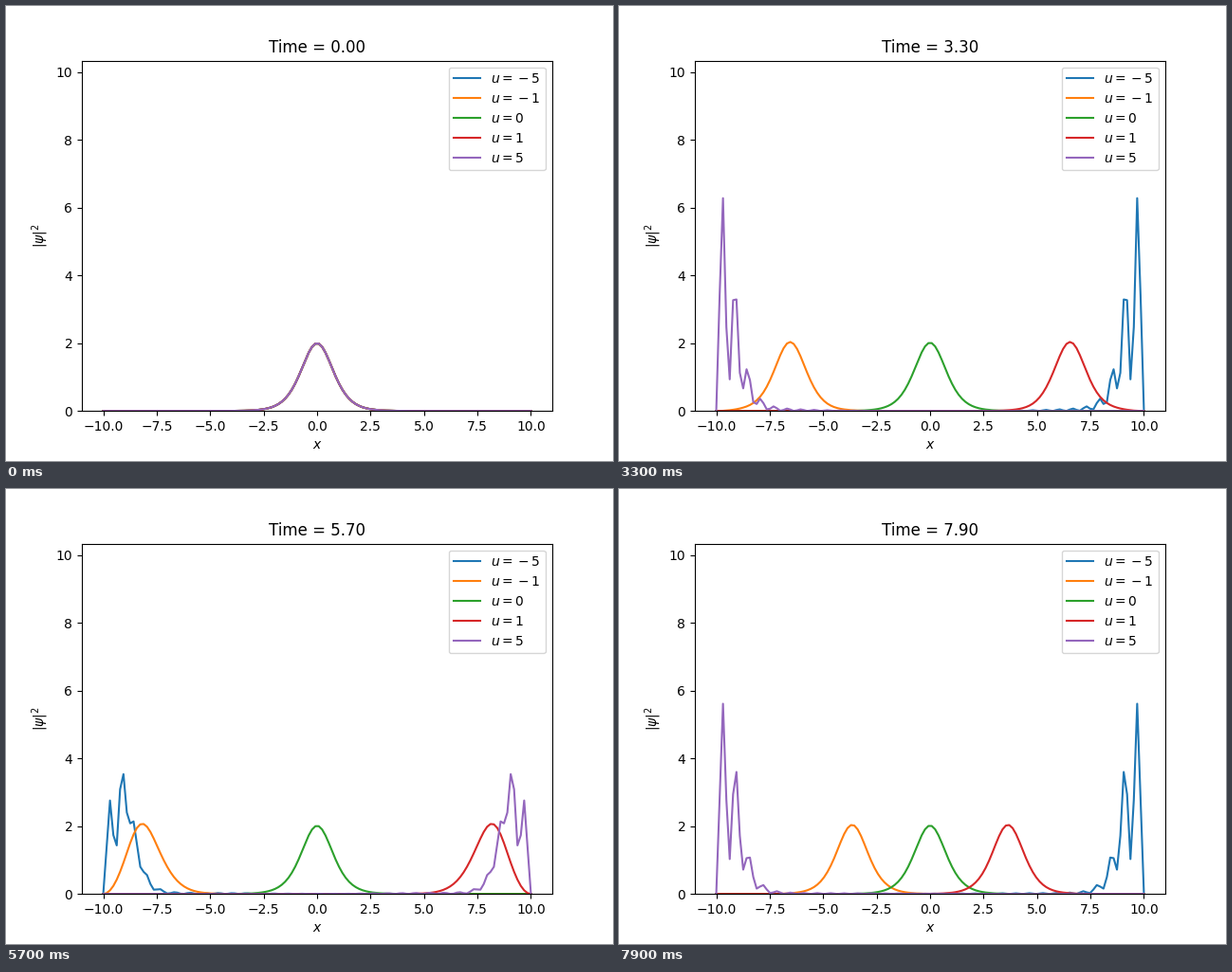
A matplotlib script for the animation above (8000 ms loop, 640x480 px).

```python
import numpy as np
import matplotlib.pyplot as plt
from matplotlib.animation import FuncAnimation

FRAMES = 80
INTERVAL = 100          # ms
FRAME_TIME = 0.1
SUBSTEPS = 100
SPEEDS = [-5, -1, 0, 1, 5]

x = np.linspace(-10, 10, 128)
dx = x[1] - x[0]


def rate(psi):
    """i psi_t = -psi_xx - |psi|^2 psi with psi = 0 at both walls."""
    out = np.zeros_like(psi)
    mid = psi[:, 1:-1]
    lap = (psi[:, 2:] - 2 * mid + psi[:, :-2]) / dx**2
    out[:, 1:-1] = 1j * (lap + (mid.real**2 + mid.imag**2) * mid)
    return out


def rk4_step(psi, dt):
    k1 = rate(psi)
    k2 = rate(psi + dt / 2 * k1)
    k3 = rate(psi + dt / 2 * k2)
    k4 = rate(psi + dt * k3)
    return psi + dt / 6 * (k1 + 2 * k2 + 2 * k3 + k4)


def solve():
    u = np.array(SPEEDS)[:, None]
    psi = np.sqrt(2) / np.cosh(x) * np.exp(1j * u * x)
    psi[:, [0, -1]] = 0
    densities = [np.abs(psi)**2]
    for _ in range(FRAMES - 1):
        for _ in range(SUBSTEPS):
            psi = rk4_step(psi, FRAME_TIME / SUBSTEPS)
        densities.append(np.abs(psi)**2)
    return densities


def label(u):
    # The empty group keeps the minus sign spaced as a binary operator.
    return f"$u={{}}-{-u}$" if u < 0 else f"$u={u}$"


density = solve()

fig, ax = plt.subplots(figsize=(6.4, 4.8), dpi=100)
lines = [ax.plot(x, d, label=label(u))[0] for u, d in zip(SPEEDS, density[0])]
ax.set_xlim(-11, 11)
ax.set_ylim(0, 10.34)
ax.set_xlabel("$x$")
ax.set_ylabel(r"$|\psi|^2$")
ax.legend(loc="upper right")
title = ax.set_title("Time = 0.00")


def update(i):
    for line, d in zip(lines, density[i]):
        line.set_ydata(d)
    title.set_text(f"Time = {i * FRAME_TIME:.2f}")
    return [*lines, title]


anim = FuncAnimation(fig, update, frames=FRAMES, interval=INTERVAL,
                     repeat=True, repeat_delay=0, blit=False)
plt.show()
```
